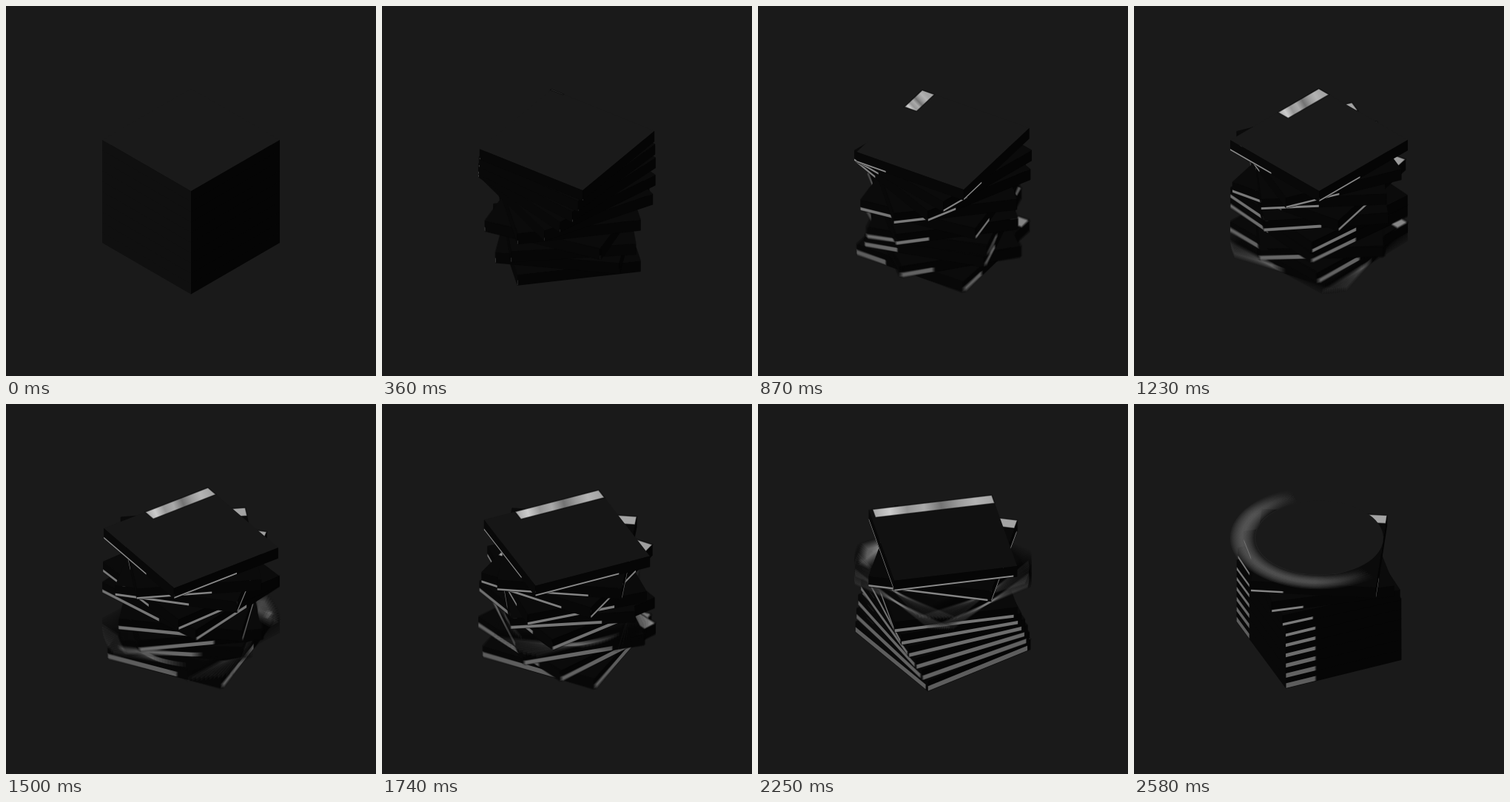
Recreate the animation shown at these times as an HTML page with a canvas. Size 500 by 500 pixels, loop 2610 ms.

```html
<!DOCTYPE html>
<html>
<head>
<meta charset="utf-8">
<style>
html, body { margin: 0; width: 100%; height: 100%; overflow: hidden; background: #1a1a1a; }
canvas { display: block; width: 500px; height: 500px; }
</style>
</head>
<body>
<canvas id="stage" width="500" height="500"></canvas>
<script>
const LOOP = 2610, STEP = 30, LAYERS = 10, SAMPLES = 12, SHUTTER = 7;
const CX = 250, TOP = 181, RADIUS = 120, TILT = 0.5774, THICK = 13.86;
const BACK = 26;

const screen = document.getElementById('stage').getContext('2d');
const buffer = document.createElement('canvas');
buffer.width = buffer.height = 500;
const ctx = buffer.getContext('2d');

const clamp = (v, lo = 0, hi = 1) => Math.min(hi, Math.max(lo, v));
const mix = (a, b, k) => a + (b - a) * k;
const smooth = k => k * k * (3 - 2 * k);
const gray = v => `rgb(${Math.round(v)},${Math.round(v)},${Math.round(v)})`;
const cosd = a => Math.cos(a * Math.PI / 180);
const sind = a => Math.sin(a * Math.PI / 180);

// Poses of the stack, top layer first; a square repeats every 90 degrees.
const times = [0, 630, 870, 1230, 1740, 2250, 2580];
const poses = [
  Array(LAYERS).fill(90),
  [72, 77.5, 84, 98, 116, 150, 120, 69, 95, 60],
  [76.5, 90, 100, 124, 159, 123, 151, 63, 120, 78],
  [90, 112, 131, 167.6, 129, 95, 96, 134, 92, 147],
  [111, 142, 164.6, 116.6, 130, 100, 145, 120, 95, 73],
  [123.4, 147, 138, 130, 123, 118, 113, 108, 104, 100],
  [123.4, 140, 122, 114, 112, 112, 112, 112, 112, 112]
];
const pace = [0.4, 1, 1, 1, 0.3, 0];

// Pick the turn count that suits each layer's speed.
for (let k = 1; k < poses.length; k++) {
  for (let i = 0; i < LAYERS; i++) {
    const speed = Math.min(0.4, 0.034 * Math.pow(1.5, i)) * pace[k - 1];
    const expected = poses[k - 1][i] + speed * (times[k] - times[k - 1]);
    poses[k][i] += 90 * Math.round((expected - poses[k][i]) / 90);
  }
}

// A fast double turn runs up the stack, one layer after another.
function whirl(t, i) {
  const middle = 2580 - 140 * i;
  return i ? 720 * smooth(clamp((t - middle) / 240 + 0.5)) : 0;
}

function angleAt(t, i) {
  let k = 0;
  while (k < times.length - 2 && t > times[k + 1]) k++;
  const part = clamp((t - times[k]) / (times[k + 1] - times[k]));
  return mix(poses[k][i], poses[k + 1][i], part) + whirl(t, i);
}

const growth = t => t <= 2250 ? clamp((t - 350) / 1900, 0, 0.97) : mix(0.97, 0.25, clamp((t - 2250) / 330));

function corner(angle, y) {
  return [CX + RADIUS * cosd(angle), y + RADIUS * TILT * sind(angle)];
}

const along = (a, b, k) => [mix(a[0], b[0], k), mix(a[1], b[1], k)];
const drop = (p, d) => [p[0], p[1] + d];

function polygon(points, fill) {
  ctx.beginPath();
  points.forEach(p => ctx.lineTo(p[0], p[1]));
  ctx.closePath();
  ctx.fillStyle = fill;
  ctx.fill();
}

function sheen(a, b) {
  const g = ctx.createLinearGradient(a[0], a[1], b[0], b[1]);
  [165, 180, 155, 115, 170, 150, 205, 165].forEach((v, n) => g.addColorStop(n / 7, gray(v)));
  return g;
}

function drawLayer(i, t) {
  const y = TOP + i * THICK, turn = angleAt(t, i), p = growth(t);
  const corners = [0, 1, 2, 3].map(k => corner(turn + 90 * k, y));
  const dim = clamp((t - 1230) / 1020) * (1 - clamp((t - 2430) / 150));
  polygon(corners, gray(i ? 11 : mix(BACK, 17, dim)));

  for (let k = 0; k < 4; k++) {
    const a = corners[k], b = corners[(k + 3) % 4], inner = corners[(k + 1) % 4];
    const normal = (((turn + 90 * k - 45) % 360) + 360) % 360;
    const end = along(a, b, p);

    if (normal < 180) {
      const left = clamp((1 - cosd(normal) / cosd(135)) / 2);
      const still = mix(0.35, 1, clamp(1 - t / 300));
      polygon([a, b, drop(b, THICK + 0.5), drop(a, THICK + 0.5)], gray(5 + 11 * (1 - left) * still));
      if (p > 0) {
        const h = 2 + 0.5 * i;
        polygon([drop(a, THICK - h), drop(end, THICK - h), drop(end, THICK), drop(a, THICK)],
          gray(138 - 5 * i));
      }
    } else if (p > 0 && normal > 205 && normal < 295 + 4 * i) {
      const inset = [(inner[0] - a[0]) * 0.115, (inner[1] - a[1]) * 0.115];
      const shift = q => [q[0] + inset[0], q[1] + inset[1]];
      polygon([a, end, shift(end), shift(a)], i ? gray(168 - 4 * i) : sheen(a, end));
      ctx.strokeStyle = 'rgba(8,8,8,0.6)';
      ctx.lineWidth = 1.5;
      ctx.stroke();
    }
  }
}

function disc(radius, fill) {
  ctx.beginPath();
  ctx.ellipse(CX, TOP, radius, radius * TILT, 0, 0, 7);
  ctx.fillStyle = fill;
  ctx.fill();
}

// The top layer turning too fast to be seen as a square.
function drawSpin(amount) {
  const glow = ctx.createConicGradient(50 * Math.PI / 180, 0, 0);
  [[0, 0], [0.12, 0.13], [0.45, 0.13], [0.56, 0], [1, 0]]
    .forEach(([at, alpha]) => glow.addColorStop(at, `rgba(110,110,110,${alpha})`));
  ctx.save();
  ctx.globalAlpha = amount;
  disc(87, gray(BACK));
  ctx.translate(CX, TOP);
  ctx.scale(1, TILT);
  ctx.strokeStyle = glow;
  for (let width = 34; width > 2; width -= 4) {
    ctx.lineWidth = width;
    ctx.beginPath();
    ctx.arc(0, 0, 103, 0, 7);
    ctx.stroke();
  }
  ctx.restore();
}

function drawScene(t) {
  ctx.fillStyle = gray(BACK);
  ctx.fillRect(0, 0, 500, 500);
  const spin = clamp((t - 2430) / 140);
  for (let i = LAYERS - 1; i > 0; i--) drawLayer(i, t);
  if (spin < 1) {
    ctx.globalAlpha = 1 - spin;
    drawLayer(0, t);
    ctx.globalAlpha = 1;
  }
  if (spin > 0) drawSpin(spin);
}

function render(t) {
  for (let n = 0; n < SAMPLES; n++) {
    drawScene(Math.max(0, t - SHUTTER * n / (SAMPLES - 1)));
    screen.globalAlpha = 1 / (n + 1);
    screen.drawImage(buffer, 0, 0);
  }
}

const start = performance.now();
let shown = -1;
function tick() {
  const t = Math.floor((performance.now() - start) / STEP) * STEP % LOOP;
  if (t !== shown) render(shown = t);
  requestAnimationFrame(tick);
}
tick();
</script>
</body>
</html>
```
